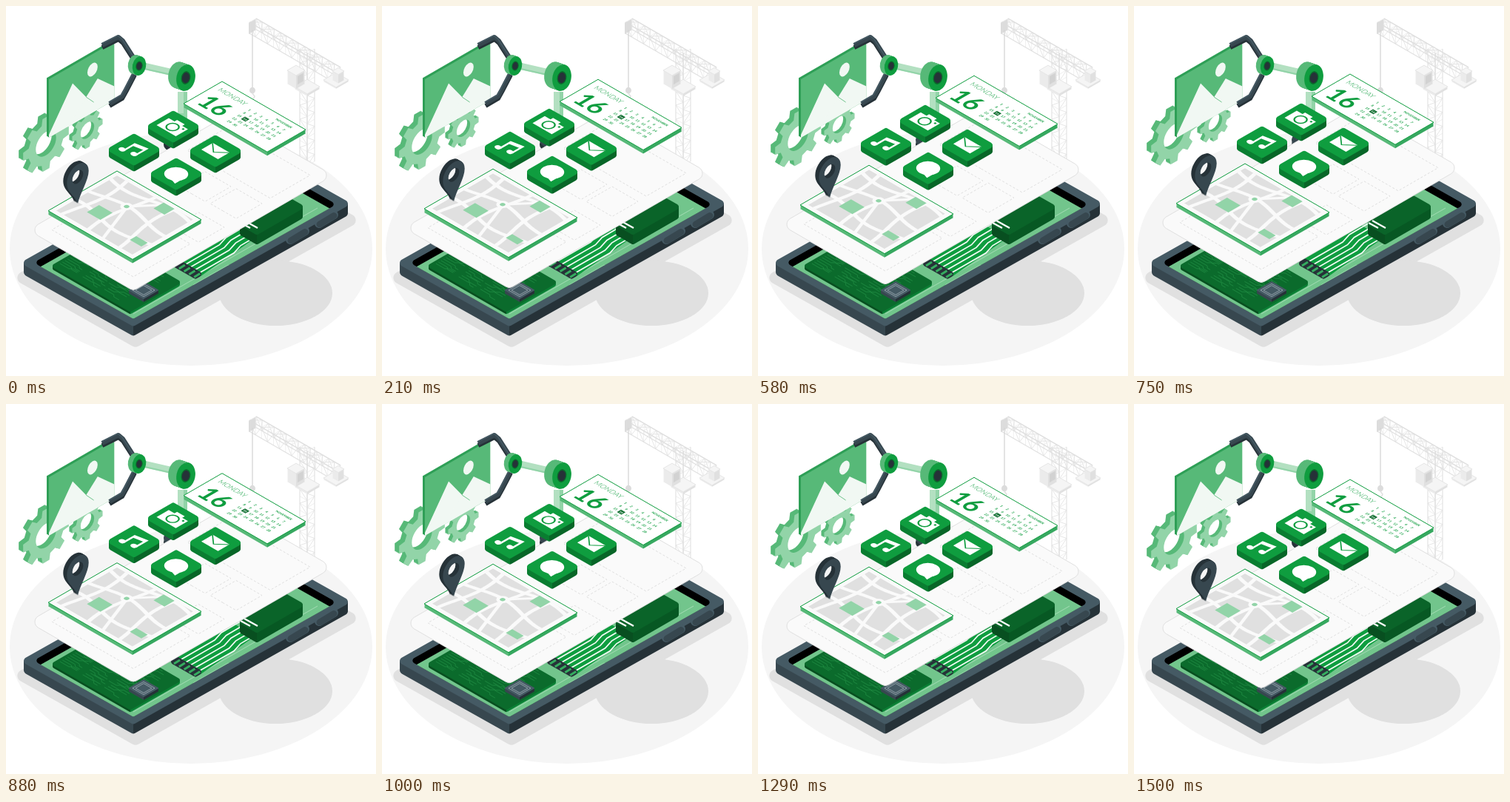
Animation of 500 by 500 pixels, one loop 1.54 s. Source, as an HTML page with a canvas:

```html
<!DOCTYPE html>
<html lang="en">
<head>
<meta charset="utf-8">
<title>Isometric app building</title>
<style>
  html, body { margin: 0; width: 100%; height: 100%; overflow: hidden; background: #fff; }
  canvas { display: block; width: 500px; height: 500px; }
</style>
</head>
<body>
<canvas id="stage" width="500" height="500"></canvas>
<script>
const ctx = document.getElementById('stage').getContext('2d');
const GREEN = '#0f9d3f', DEEP = '#0b6b2c', SHADE = '#084f20', MID = '#57b978', PALE = '#92d4a8', MINT = '#b3e0c1';
const SLATE = '#455a64', DARK = '#37474f', INK = '#263238', GREY = '#e0e0e0', PAPER = '#fafafa';
const LOOP = 1540, PERIOD = 1500, STEPS = 36, LIFT = 10;
const ISO = .577, TAU = Math.PI * 2;

function tracePoly(pts, r = 0) {
  const [a, z] = [pts[0], pts[pts.length - 1]];
  ctx.beginPath();
  ctx.moveTo((a[0] + z[0]) / 2, (a[1] + z[1]) / 2);
  pts.forEach((p, i) => {
    const q = pts[(i + 1) % pts.length];
    ctx.arcTo(p[0], p[1], (p[0] + q[0]) / 2, (p[1] + q[1]) / 2, r);
  });
  ctx.closePath();
}

function paint(fill, stroke, width = 1) {
  if (fill) { ctx.fillStyle = fill; ctx.fill(); }
  if (stroke) { ctx.strokeStyle = stroke; ctx.lineWidth = width; ctx.stroke(); }
}

function poly(pts, fill, r, stroke, width) {
  tracePoly(pts, r);
  paint(fill, stroke, width);
}

function line(pts, color, width = 1) {
  ctx.beginPath();
  pts.forEach(p => ctx.lineTo(p[0], p[1]));
  paint(null, color, width);
}

function oval(x, y, rx, ry, fill, turn = 0) {
  ctx.beginPath();
  ctx.ellipse(x, y, rx, ry, turn, 0, TAU);
  paint(fill);
}

function rect(x, y, w, h, fill) {
  ctx.fillStyle = fill;
  ctx.fillRect(x, y, w, h);
}

function clipped(draw) {
  ctx.save();
  ctx.clip();
  draw();
  ctx.restore();
}

function within(matrix, draw) {
  ctx.save();
  ctx.transform(...matrix);
  draw();
  ctx.restore();
}
const onFloor = (x, y, draw) => within([.866, .5, -.866, .5, x, y], draw);
const onWall = (x, y, draw) => within([.866, -.5, 0, 1, x, y], draw);
const shifted = (x, y, draw) => within([1, 0, 0, 1, x, y], draw);

function randomizer(seed) {
  return () => (seed = seed * 16807 % 2147483647) / 2147483647;
}

// Floor rectangle from its far corner, spanning a px right and b px left.
const tile = (x, y, a, b, slope = ISO) =>
  [[x - b, y + b * slope], [x, y], [x + a, y + a * slope], [x + a - b, y + (a + b) * slope]];
const diamond = (x, y, w) => tile(x, y - w * ISO, w, w);

function block(pts, depth, top, left, right, r = 0, stroke) {
  const split = pts[3][0];
  const side = ctx.createLinearGradient(split - 1, 0, split + 1, 0);
  side.addColorStop(.5, left);
  side.addColorStop(.5, right);
  for (let d = depth; d > 0; d--) shifted(0, d, () => poly(pts, side, r));
  poly(pts, top, r, stroke);
}

function lattice(x, y, dx, dy, ox, oy, bays) {
  const at = (t, side) => [x + dx * t + ox * side, y + dy * t + oy * side];
  const zig = [];
  for (let i = 0; i <= bays; i++) {
    zig.push(at(i / bays, i % 2));
    line([at(i / bays, 0), at(i / bays, 1)], '#e8e8e8', .7);
  }
  line(zig, GREY, .8);
  for (const side of [0, 1]) line([at(0, side), at(1, side)], GREY, 1.1);
}

const crate = (x, y, w, tall) => block(diamond(x, y, w), tall, '#f5f5f5', '#ebebeb', GREY, 0, '#e6e6e6');

function crane() {
  for (const s of [1, -1]) lattice(402 - 5 * s, 61 - 3 * s, 0, 152, 10, 6 * s, 16);
  for (const d of [0, 9]) lattice(329 + d, 22 - d * ISO, 114, 66, 0, 15, 14);
  lattice(329, 22, 114, 66, 9, -5, 14);
  onWall(328, 23, () => rect(0, 0, 11, 15, '#dcdcdc'));
  line([[333, 32], [333, 111]], '#d6d6d6', 1.3);
  oval(333, 114, 4, 4.3, '#dcdcdc');
  line([[333, 118], [336, 122], [334, 126]], GREY, 1.5);
  crate(407, 109, 17, 3);
  crate(392, 87, 12, 18);
  onWall(394, 95, () => rect(0, 0, 9, 11, '#d2d2d2'));
  crate(446, 100, 17, 2);
  crate(449, 88, 8, 12);
}

function circuit() {
  const rand = randomizer(11);
  onFloor(130, 311, () => {
    for (let y = 6; y < 74; y += 4) {
      for (let x = 4; x < 100; x += 30 + rand() * 10) {
        const bend = rand() < .5 ? 3 : -3, run = 8 + rand() * 12;
        line([[x, y], [x + run, y], [x + run + 3, y + bend], [x + 26, y + bend]], '#1f8b42', .8);
      }
    }
  });
}

function ribbon() {
  poly([[224, 345], [305, 295], [336, 314], [262, 366]], GREEN, 4);
  for (let i = 0; i < 5; i++) {
    const x = 230 + 6.5 * i, y = 349 + 3.7 * i;
    line([[x, y], [x + 52, y - 30], [x + 61, y - 40], [x + 88, y - 56]], '#f4fbf6', 1.7);
  }
  poly(tile(231, 341, 37, 12), INK, 4);
  for (let i = 0; i < 5; i++) {
    const x = 227 + 6.8 * i, y = 351 + 3.9 * i;
    line([[x, y], [x + 8, y - 5]], '#35ad5f', 3);
  }
}

function phone() {
  block(tile(314, 181, 153, 295, .563), 13, SLATE, DARK, INK, 5);
  const opening = tile(312, 192, 135, 275, .563);
  tracePoly(opening, 4);
  clipped(() => {
    paint('#000');
    shifted(0, 11, () => poly(opening, '#72c58c', 4));
    line([[172, 416], [421, 273]], '#a3dcb4');
    line([[253, 377], [300, 350], [308, 353], [352, 328]], '#a3dcb4', .8);
    block(tile(130, 311, 108, 70), 3, DEEP, SHADE, '#0a8034', 3);
    circuit();
    block(diamond(186, 384, 21), 4, SLATE, DARK, INK, 1);
    for (const w of [15, 11]) poly(diamond(186, 384, w), null, 0, '#b0bec5', .7);
    ribbon();
    block(tile(378, 256, 27, 66), 13, '#0a6429', SHADE, '#075823', 4);
    for (const d of [0, 5]) line([[322 - d, 290 + d * .6], [340 - 2 * d, 300]], '#fff', 2.2);
  });

  ctx.lineCap = 'round';
  for (const [x, y] of [[384, 316], [423, 294]]) {
    line([[x, y], [x + 20, y - 12]], SLATE, 12);
    line([[x + 1, y + 1], [x + 20, y - 10.5]], DARK, 9);
  }
  ctx.lineCap = 'butt';
}

// Upright plate with visible thickness behind its front face.
function plate(shape, x, y, depth, face, edge) {
  for (let d = depth; d >= 0; d--) {
    onWall(x - d, y - d * ISO, () => {
      ctx.fillStyle = d ? edge : face;
      ctx.fill(shape, 'evenodd');
    });
  }
}

function gear(x, y, radius, depth) {
  const shape = new Path2D(), teeth = 8;
  for (let i = 0; i < teeth; i++) {
    for (const part of [-.31, -.19, .19, .31]) {
      const a = (i + part) * TAU / teeth;
      const r = radius * (Math.abs(part) < .2 ? 1 : .77);
      shape.lineTo(Math.cos(a) * r, Math.sin(a) * r);
    }
  }
  shape.closePath();
  shape.moveTo(radius * .44, 0);
  shape.arc(0, 0, radius * .44, 0, TAU);
  plate(shape, x, y, depth, PALE, MID);
}

function picture() {
  const w = 102, h = 79, snow = '#f1f8f3';
  const peak = (x, y, slope) => poly([[x - 90, y + 90 * slope], [x, y], [x + 90, y + 90 * slope]], snow);
  const panel = new Path2D();
  panel.rect(0, -h, w, h);
  plate(panel, 58, 178, 3, MID, '#2e9f56');
  onWall(58, 178, () => {
    ctx.beginPath();
    ctx.rect(0, -h, w, h);
    clipped(() => {
      oval(68, -58, 8, 8.5, snow);
      peak(37, -55, 1.38);
      peak(76, -42, .9);
      line([[58, -26], [70, -13]], MID, .8);
    });
  });
}

function claw(pts) {
  shifted(0, 3, () => line(pts, INK, 6));
  line(pts, DARK, 6);
  shifted(-1, -2, () => line(pts, SLATE, 1.6));
}

function joint(x, y, r, depth) {
  const disc = (k, fill, d = 0) => oval(x - d, y - d * .35, r * .7 * k, r * k, fill, .2);
  for (let d = depth; d > 0; d--) disc(1, MID, d);
  disc(1, GREEN);
  disc(.5, DEEP);
  disc(.4, INK);
}

function robot() {
  rect(232, 116, 13, 70, MINT);
  rect(240, 116, 5, 70, PALE);
  oval(236, 187, 23, 13, INK);
  oval(236, 181, 23, 13, DARK);
  rect(232, 145, 13, 35, PALE);
  ctx.lineJoin = 'round';
  claw([[130, 53], [152, 42], [158, 47], [174, 72]]);
  claw([[140, 132], [157, 122], [162, 113], [174, 90]]);
  ctx.lineJoin = 'miter';
  line([[186, 81], [234, 92]], MINT, 9);
  line([[188, 85], [233, 95]], PALE, 2);
  joint(180, 81, 13, 6);
  joint(243, 97, 18, 11);
}

function sheet() {
  poly(tile(300, 147, 142, 270), PAPER, 9, GREY);
  ctx.setLineDash([3, 2.5]);
  const slots = [
    tile(139, 258, 110, 77), tile(299, 164, 112, 54),
    diamond(311, 267, 35), diamond(269, 244, 35), diamond(260, 299, 35)
  ];
  slots.forEach(s => poly(s, null, 0, '#dcdcdc', .9));
  ctx.setLineDash([]);
}

function streets() {
  for (let i = 0; i < 3; i++) {
    const across = [], along = [];
    for (let t = 0; t <= 131; t += 5) {
      across.push([t, 14 + 31 * i + 6 * Math.sin(t / 21 + i * 2)]);
      along.push([20 + 40 * i + 6 * Math.sin(t / 25 + i * 1.7), t]);
    }
    line(across, PAPER, 5);
    line(along, PAPER, 5);
  }
  line([[56, 40], [90, 0]], PAPER, 4);
  line([[56, 40], [82, 107]], PAPER, 4);
  oval(55.5, 40.5, 7, 7, PAPER);
  oval(55.5, 40.5, 3, 3, PALE);
}

function cityMap() {
  block(tile(150, 223, 114, 93), 5, PAPER, MID, '#37a860', 0, GREEN);
  onFloor(150, 223, () => {
    ctx.beginPath();
    ctx.rect(6, 6, 119, 95);
    clipped(() => {
      paint(GREY);
      streets();
      rect(32, 60, 21, 19, PALE);
      rect(79, 6, 17, 16, PALE);
      rect(103, 73, 18, 10, PALE);
    });
  });
}

function pin() {
  const shape = new Path2D();
  shape.moveTo(0, 35);
  shape.bezierCurveTo(-4, 22, -17, 12, -17, -1);
  shape.arc(0, -1, 17, Math.PI, 0);
  shape.bezierCurveTo(17, 12, 4, 22, 0, 35);
  shape.moveTo(8.5, -1);
  shape.arc(0, -1, 8.5, 0, TAU);
  plate(shape, 97, 232, 5, DARK, INK);
}

function calendar() {
  block(tile(292, 102, 113, 52), 5, '#fff', MID, '#37a860', 0, GREEN);
  onFloor(292, 102, () => {
    const put = (text, x, y, font, align, color = GREEN) => {
      ctx.font = font + ' Lato, sans-serif';
      ctx.textAlign = align;
      ctx.fillStyle = color;
      ctx.fillText(text, x, y);
    };
    put('MONDAY', 8, 15.5, '300 9.5px', 'left');
    put('16', 8, 50, 'bold 33px', 'left');
    put('NOVEMBER', 117, 10, 'bold 4.3px', 'right');
    for (let day = 1; day <= 30; day++) {
      const x = 60 + (day - 1) % 7 * 8.9, y = 17 + Math.floor((day - 1) / 7) * 7.9;
      const today = day === 16;
      if (today) rect(x - 3.5, y - 3.2, 7, 6.4, DEEP);
      put(day, x, y + 1.7, 'bold 4.6px', 'center', today ? '#fff' : GREEN);
    }
  });
}

function cameraGlyph() {
  rect(-15, -8, 30, 19, '#fff');
  rect(-6, -12, 12, 5, '#fff');
  oval(0, 1, 8, 8, GREEN);
  oval(0, 1, 6, 6, '#fff');
  oval(11, -4.5, 1.5, 1.5, GREEN);
}

function musicGlyph() {
  line([[-6.8, 9], [-6.8, -8], [8.8, -11], [8.8, 6]], '#fff', 2.8);
  line([[-7, -6], [9, -9]], '#fff', 4);
  oval(-9.5, 9, 4.3, 3.6, '#fff');
  oval(6, 6, 4.3, 3.6, '#fff');
}

function mailGlyph() {
  rect(-13, -9, 26, 18, '#fff');
  line([[-13, -8.5], [0, 3], [13, -8.5]], GREEN, 1.4);
}

function chatGlyph() {
  oval(0, 0, 13.5, 13, '#fff');
  poly([[3, 11], [12, 5], [12, 14]], '#fff');
}

function appIcon(x, y, glyph) {
  block(diamond(x, y, 38), 8, GREEN, '#0a7d31', '#086628', 4);
  onFloor(x, y, glyph);
}

function render(lift) {
  rect(0, 0, 500, 500, '#fff');
  oval(250, 328, 245, 158, '#f5f5f5');
  poly(tile(313, 195, 168, 306, .563), GREY, 8);
  oval(364.5, 388, 76.5, 44, GREY);
  crane();
  phone();
  shifted(0, -lift, () => {
    gear(110, 168, 24, 4);
    gear(54, 186, 36, 6);
  });
  picture();
  robot();
  shifted(0, -lift, () => {
    sheet();
    cityMap();
    pin();
    calendar();
    appIcon(226, 163, cameraGlyph);
    appIcon(173, 194, musicGlyph);
    appIcon(283, 196, mailGlyph);
    appIcon(230, 227, chatGlyph);
  });
}

// Linear rise and fall, held on 24 steps per second.
function frame() {
  const time = performance.now() % LOOP;
  const step = Math.min(STEPS, Math.floor((time + 5) * STEPS / PERIOD));
  render(LIFT * (1 - Math.abs(1 - step * 2 / STEPS)));
  requestAnimationFrame(frame);
}
frame();
</script>
</body>
</html>
```
